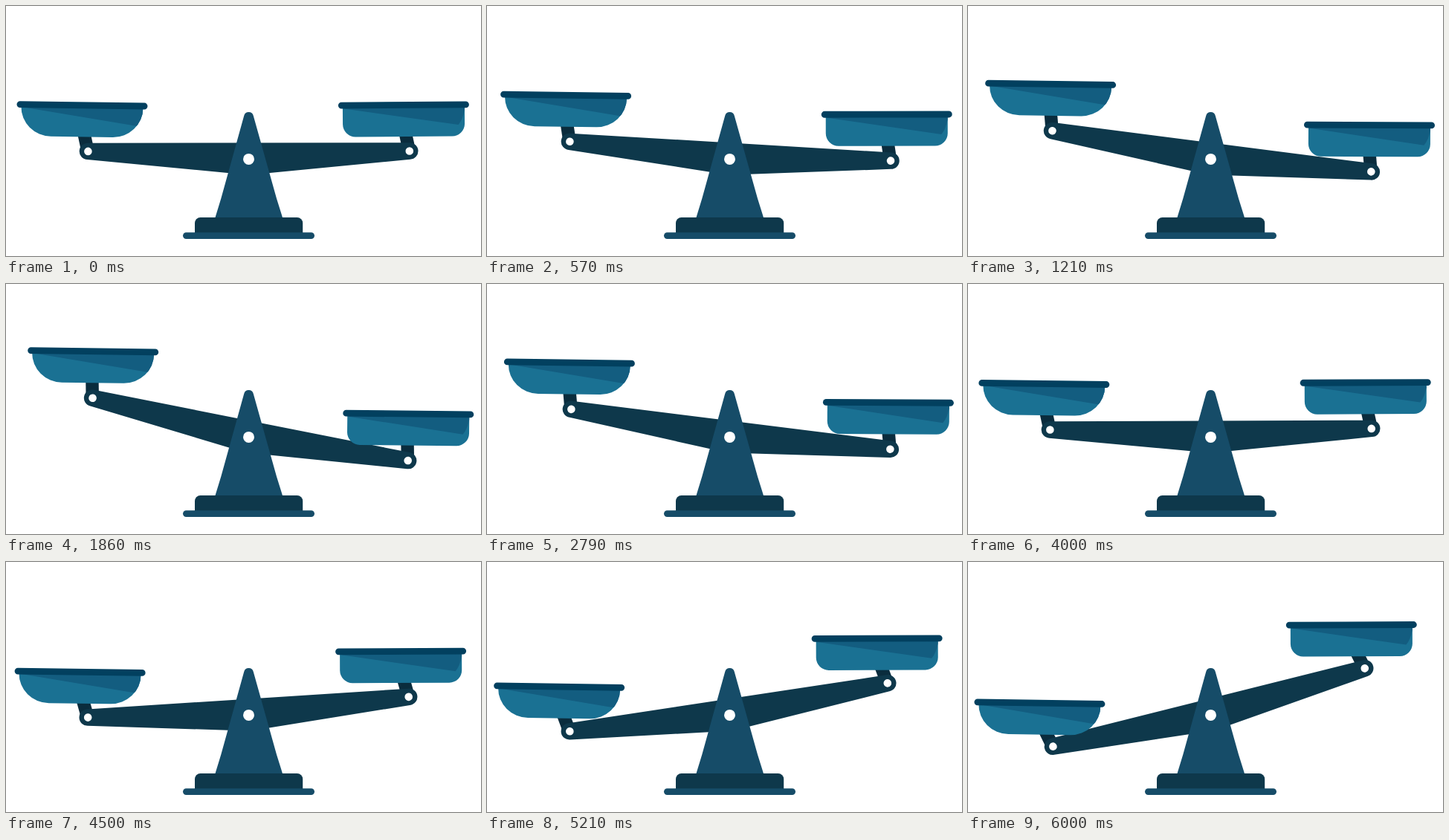
An HTML page for the animation above (6070 ms loop, 639 px wide and 337 px high).

```html
<!DOCTYPE html>
<html lang="en">
<head>
<meta charset="utf-8">
<title>Balance scale</title>
<style>
  html, body { margin: 0; width: 100%; height: 100%; overflow: hidden; background: #fff; }
  svg { display: block; width: 100%; height: 100%; }
  .beam { fill: #0e384b; }
  .stem { fill: #0a2c3d; }
  .post { fill: #164c68; }
  .rim { fill: #02405f; }
  .bowl { fill: #1a7193; }
  .shade { fill: #135d80; }
  .pin { fill: #fff; }
</style>
</head>
<body>
<svg viewBox="0 0 639 337">
  <defs>
    <path id="round" d="M-82 3A40.5 39.5 0 0 0 -41.5 42.5H41.5A40.5 39.5 0 0 0 82 3Z"/>
    <clipPath id="inRound"><use href="#round"/></clipPath>
    <rect id="stem" class="stem" x="-9" y="-40" width="17.4" height="40"/>
    <rect id="rim" class="rim" x="-88" y="-4.4" width="176" height="8.8" rx="4.4"/>
  </defs>

  <g id="beam">
    <use href="#stem" transform="translate(-216.2 -10.3) rotate(-12)"/>
    <use href="#stem" transform="translate(216.2 -10.3) rotate(-12)"/>
    <path class="beam" d="M-216.2 -21.5H216.2A11.2 11.2 0 0 1 217.2 .9L0 21.7L-217.2 .9A11.2 11.2 0 0 1 -216.2 -21.5Z"/>
    <circle class="pin" cx="-216.2" cy="-10.3" r="5.3"/>
    <circle class="pin" cx="216.2" cy="-10.3" r="5.3"/>
  </g>

  <g id="leftPan">
    <use class="bowl" href="#round"/>
    <path class="shade" clip-path="url(#inRound)" d="M-80 3.5L73 27L90 30V3Z"/>
    <use href="#rim"/>
  </g>

  <g id="rightPan">
    <path class="bowl" d="M-82 0V25.5A17 17 0 0 0 -65 42.5H65A17 17 0 0 0 82 25.5V0Z"/>
    <path class="shade" d="M-80 4.5L73.5 27Q79.5 20 82 7V0H-80Z"/>
    <use href="#rim"/>
  </g>

  <path class="post" d="M320.2 148A6.5 6.5 0 0 1 332.8 148L364 259.5L372.6 287H280.9L289.3 259.5Z"/>
  <circle class="pin" cx="326.5" cy="206.4" r="7.5"/>
  <path class="beam" d="M254 307V292.5A7.5 7.5 0 0 1 261.5 285H391.7A7.5 7.5 0 0 1 399.2 292.5V307Z"/>
  <rect class="post" x="238" y="305.2" width="177" height="8.8" rx="4.4"/>
</svg>
<script>
  const LOOP = 6070, FPS = 14;
  const PIVOT = { x: 326.6, y: 206 };
  const ARM = 216.2, RISE = 10.3;
  const STEM = 43.6, STEM_TILT = -12;

  // time, beam angle, left pan angle, right pan angle
  const KEYS = [
    [0, -0.05, 0.8, -0.4],
    [1982, 12, 0.75, 0.65],
    [3970, 0, 0.7, -0.25],
    [6000, -14.1, 0.9, -0.2]
  ];

  const byId = id => document.getElementById(id);
  const beam = byId("beam"), leftPan = byId("leftPan"), rightPan = byId("rightPan");
  const rad = deg => deg * Math.PI / 180;

  function poseAt(t) {
    let i = 1;
    while (i < KEYS.length - 1 && t > KEYS[i][0]) i++;
    const a = KEYS[i - 1], b = KEYS[i];
    const u = Math.min(1, (t - a[0]) / (b[0] - a[0]));
    return a.slice(1).map((v, n) => v + (b[n + 1] - v) * u);
  }

  const place = (el, x, y, deg) =>
    el.setAttribute("transform", `translate(${x.toFixed(2)} ${y.toFixed(2)}) rotate(${deg.toFixed(3)})`);

  // A pan sits on the tip of its stem, which tilts with the beam.
  function placePan(el, side, tilt, deg) {
    const a = rad(tilt), s = rad(tilt + STEM_TILT);
    const pinX = PIVOT.x + side * ARM * Math.cos(a) + RISE * Math.sin(a);
    const pinY = PIVOT.y + side * ARM * Math.sin(a) - RISE * Math.cos(a);
    place(el, pinX + STEM * Math.sin(s) + 1.2, pinY - STEM * Math.cos(s) - 19.4, deg);
  }

  function draw() {
    const t = performance.now() % LOOP;
    const step = Math.floor((t + 5) * FPS / 1000);
    const [tilt, left, right] = poseAt(Math.min(step * 1000 / FPS, 6000));
    place(beam, PIVOT.x, PIVOT.y, tilt);
    placePan(leftPan, -1, tilt, left);
    placePan(rightPan, 1, tilt, right);
    requestAnimationFrame(draw);
  }
  draw();
</script>
</body>
</html>
```
